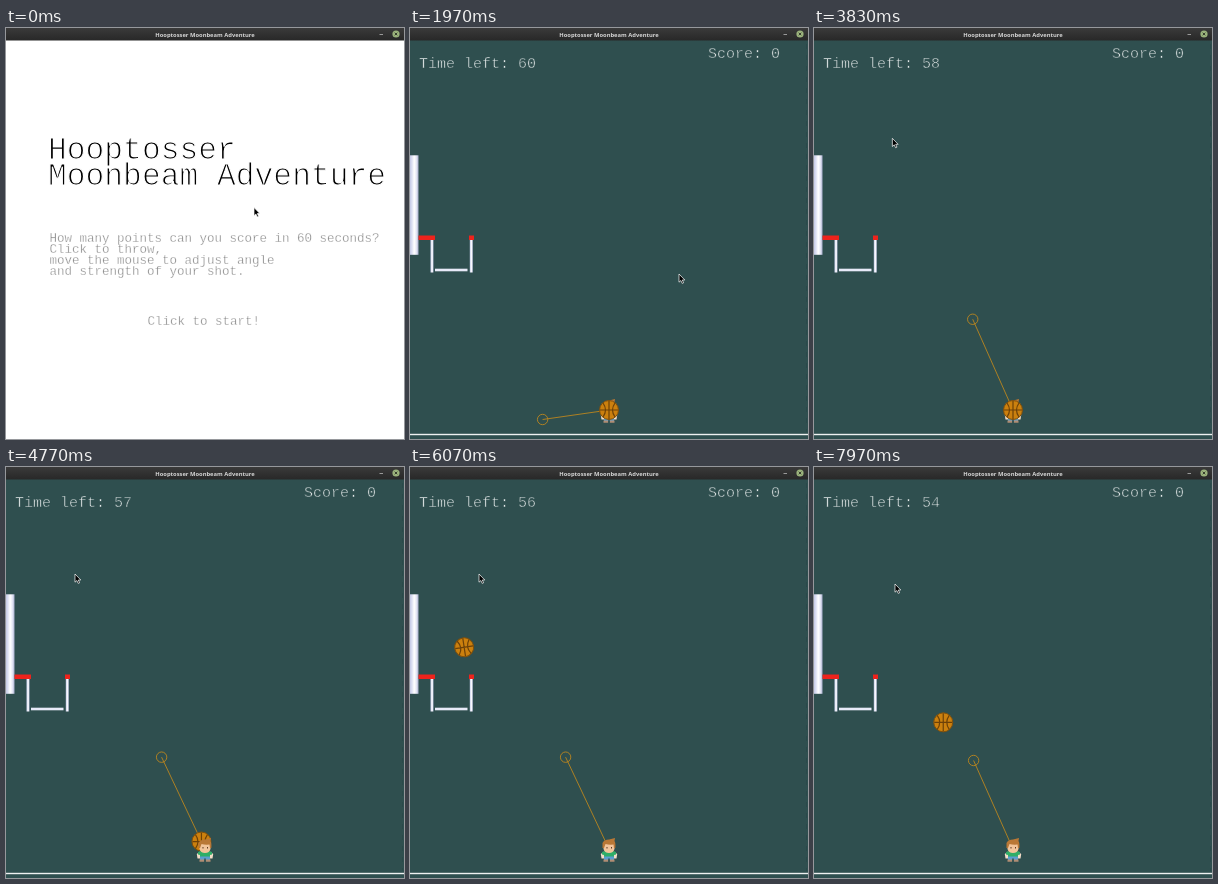
Animation of 398 by 411 pixels, one loop 8 s. Source, as an HTML page:

```html
<!DOCTYPE html>
<html lang="en">
<head>
<meta charset="utf-8">
<title>Hooptosser Moonbeam Adventure</title>
<style>
  html, body { margin: 0; width: 100%; height: 100%; overflow: hidden; background: #fff; }
  svg { display: block; width: 398px; height: 411px; }
  text { font-family: "Liberation Mono", monospace; white-space: pre; }
  .bar { font: 700 5.8px "Noto Sans", "Open Sans", sans-serif; fill: #d6d6d6; text-anchor: middle; }
  .head { font-size: 31.3px; fill: #000; stroke: #fff; stroke-width: 1.2px; }
  .help { font-size: 12.5px; fill: #858585; stroke: #fff; stroke-width: .35px; }
  .hud { font-size: 15px; fill: #e6ebeb; stroke: #2f4f4f; stroke-width: .5px; }
  .aim { fill: none; stroke: #bb861f; stroke-width: .9; }
</style>
</head>
<body>
<svg viewBox="0 0 398 411" xmlns="http://www.w3.org/2000/svg">
  <defs>
    <linearGradient id="steel">
      <stop offset="0" stop-color="#c3c8e6"/>
      <stop offset=".25" stop-color="#dfe2f4"/>
      <stop offset=".5" stop-color="#fff"/>
      <stop offset=".75" stop-color="#e6e8f6"/>
      <stop offset="1" stop-color="#aab0cf"/>
    </linearGradient>
    <linearGradient id="frame" x2="0" y2="1">
      <stop offset="0" stop-color="#3a3a3a"/>
      <stop offset="1" stop-color="#282828"/>
    </linearGradient>
    <g id="ball">
      <circle r="9.5" fill="#cb800e" stroke="#80500c" stroke-width="1"/>
      <path d="M0-9V9M-9 0H9M-6-7Q-1 0-6 7M6-7Q1 0 6 7" fill="none" stroke="#6d4108" stroke-width="1.2"/>
    </g>
  </defs>

  <g id="intro">
    <rect width="398" height="411" fill="#fff"/>
    <g class="head">
      <text x="42" y="130.5">Hooptosser</text>
      <text x="42" y="156.5">Moonbeam Adventure</text>
    </g>
    <g class="help">
      <text x="43.5" y="214">How many points can you score in 60 seconds?</text>
      <text x="43.5" y="225">Click to throw,</text>
      <text x="43.5" y="236">move the mouse to adjust angle</text>
      <text x="43.5" y="247">and strength of your shot.</text>
      <text x="141.5" y="297">Click to start!</text>
    </g>
  </g>

  <g id="game">
    <rect width="398" height="411" fill="#2f4f4f"/>
    <path d="M396.5 16V404" stroke="#2a494a" stroke-dasharray="5 6"/>
    <text class="hud" x="9" y="39.5">Time left: <tspan id="clock">60</tspan></text>
    <text class="hud" x="298" y="29.5">Score: 0</text>
    <g fill="url(#steel)">
      <rect y="127.3" width="8.5" height="99.5"/>
      <rect x="20.5" y="212" width="3" height="32.5"/>
      <rect x="59.8" y="212" width="3" height="32.5"/>
    </g>
    <rect x="25" y="240.7" width="32.5" height="2.6" fill="#e8eaf8"/>
    <path d="M8.5 207.5h16.5v4.5h-16.5zM59 207.5h5v4.5h-5z" fill="#ee231c"/>
    <rect y="405.8" width="398" height="1.4" fill="#eef1f1"/>
    <line id="line" class="aim" x1="199" y1="382"/>
    <circle id="ring" class="aim" r="5.2"/>
    <use id="thrown" href="#ball"/>
    <g>
      <path d="M194 388h10v5h-4.2v-1.500h-1.600v1.500h-4.200z" fill="#5a9fd0"/>
      <path d="M193.500 392.500h4.600v2.300h-4.600zM199.900 392.500h4.600v2.300h-4.600z" fill="#b08d74"/>
      <path d="M190.800 387l3.200-2.500v7h-2.500zM207.200 387l-3.200-2.500v7h2.500z" fill="#f3ddc8"/>
      <path d="M192 385q7-3 14 0v2.500l-2 .5v1.500h-10v-1.500l-2-.5z" fill="#2fae68"/>
      <path d="M193.500 377h11v5q-1 4-5.500 4t-5.500-4z" fill="#f2c59b"/>
      <path d="M192.500 381v-5q1.500-3.500 6.500-3.500l6-1.500-.5 3q1.300 2 .8 7h-1.300l-.5-3.500q-4.500.5-8-.5l-1.500 4z" fill="#b97836"/>
      <path d="M196.500 380h1v1.500h-1zM201 380h1v1.500h-1z" fill="#5c3a22"/>
    </g>
    <use id="held" href="#ball" x="199" y="382"/>
  </g>

  <rect width="398" height="12.500" fill="url(#frame)"/>
  <text class="bar" x="199" y="8.600">Hooptosser Moonbeam Adventure</text>
  <path d="M373.500 6.500h3.500" stroke="#b4b4b4" stroke-width=".8"/>
  <circle cx="390" cy="6" r="3.600" fill="#9bb37c"/>
  <path d="M388.700 4.700l2.600 2.600m0-2.600l-2.600 2.600" stroke="#2c3325" stroke-width=".9"/>

  <path id="cursor" d="M0 0V8.200L1.900 6.500 3.200 9.400 4.600 8.800 3.300 6H5.800z" fill="#000" stroke="#fff" stroke-width=".7"/>
</svg>
<script>
const LOOP = 8000, START = 1970, AIMED = 2470;
const HAND = { x: 199, y: 382 };
const G = 0.00044;

// time, x, y
const MOUSE = [
  [180, 248, 179.5], [800, 262, 241], [1029, 262, 241], [1030, 269, 246],
  [2440, 269, 246], [3130, 103, 121], [3270, 100, 118], [3310, 100, 118],
  [4130, 69, 107], [6780, 69, 107], [7330, 81, 117]
];
const TICKS = [2330, 3370, 4400, 5400, 6400, 7330];
// time, horizontal distance from the hand
const SHOT = [[4753, 0], [5400, 128], [5570, 169], [5630, 181]];

const $ = id => document.getElementById(id);
const [intro, game, clock, line, ring, thrown, held, cursor] =
  ['intro', 'game', 'clock', 'line', 'ring', 'thrown', 'held', 'cursor'].map($);
const linear = p => p;
const smooth = p => p * p * (3 - 2 * p);
const show = (el, on) => el.setAttribute('visibility', on ? 'inherit' : 'hidden');
const set = (el, attrs) => {
  for (const k in attrs) el.setAttribute(k, attrs[k]);
};

function sample(keys, t, ease) {
  if (t <= keys[0][0]) return keys[0].slice(1);
  const i = keys.findIndex(k => k[0] > t);
  if (i < 0) return keys[keys.length - 1].slice(1);
  const a = keys[i - 1], b = keys[i];
  const p = ease((t - a[0]) / (b[0] - a[0]));
  return a.slice(1).map((v, n) => v + (b[n + 1] - v) * p);
}

function aimAt(t) {
  const [mx, my] = t < AIMED ? [0, 411] : sample(MOUSE, t, smooth);
  return { x: 132.6 + mx / 3, y: 254.5 + my / 3 };
}

// Parabola through the hand, launched along the aim line
function arc(u, aim) {
  const dx = HAND.x - aim.x, dy = HAND.y - aim.y;
  const curve = 0.00506 * (43.5 / dx) ** 2;
  return { x: HAND.x - u, y: HAND.y - u * dy / dx + curve * u * u, spin: 0 };
}

function flight(t) {
  const aim = aimAt(t);
  if (t >= 7630) return arc((t - 7600) * 0.188, aim);
  if (t < 4770 || t >= 6810) return null;
  if (t < 5785) return arc(sample(SHOT, t, linear)[0], aim);
  const d = t - 5785;
  return { x: 18 + 0.1264 * d, y: 166 - 0.013 * d + G * d * d / 2, spin: -0.03 * d };
}

function draw(t) {
  const playing = t >= START;
  show(intro, !playing);
  show(game, playing);
  const [mx, my] = sample(MOUSE, t, smooth);
  set(cursor, { transform: `translate(${mx} ${my})` });
  if (!playing) return;

  clock.textContent = 60 - TICKS.filter(k => t >= k).length;
  const aim = aimAt(t);
  set(line, { x2: aim.x, y2: aim.y });
  set(ring, { cx: aim.x, cy: aim.y });
  const ball = flight(t);
  show(held, !ball);
  show(thrown, ball);
  if (ball) set(thrown, { transform: `translate(${ball.x} ${ball.y}) rotate(${ball.spin})` });
}

const origin = performance.now();
function tick() {
  draw((performance.now() - origin) % LOOP);
  requestAnimationFrame(tick);
}
tick();
</script>
</body>
</html>
```
